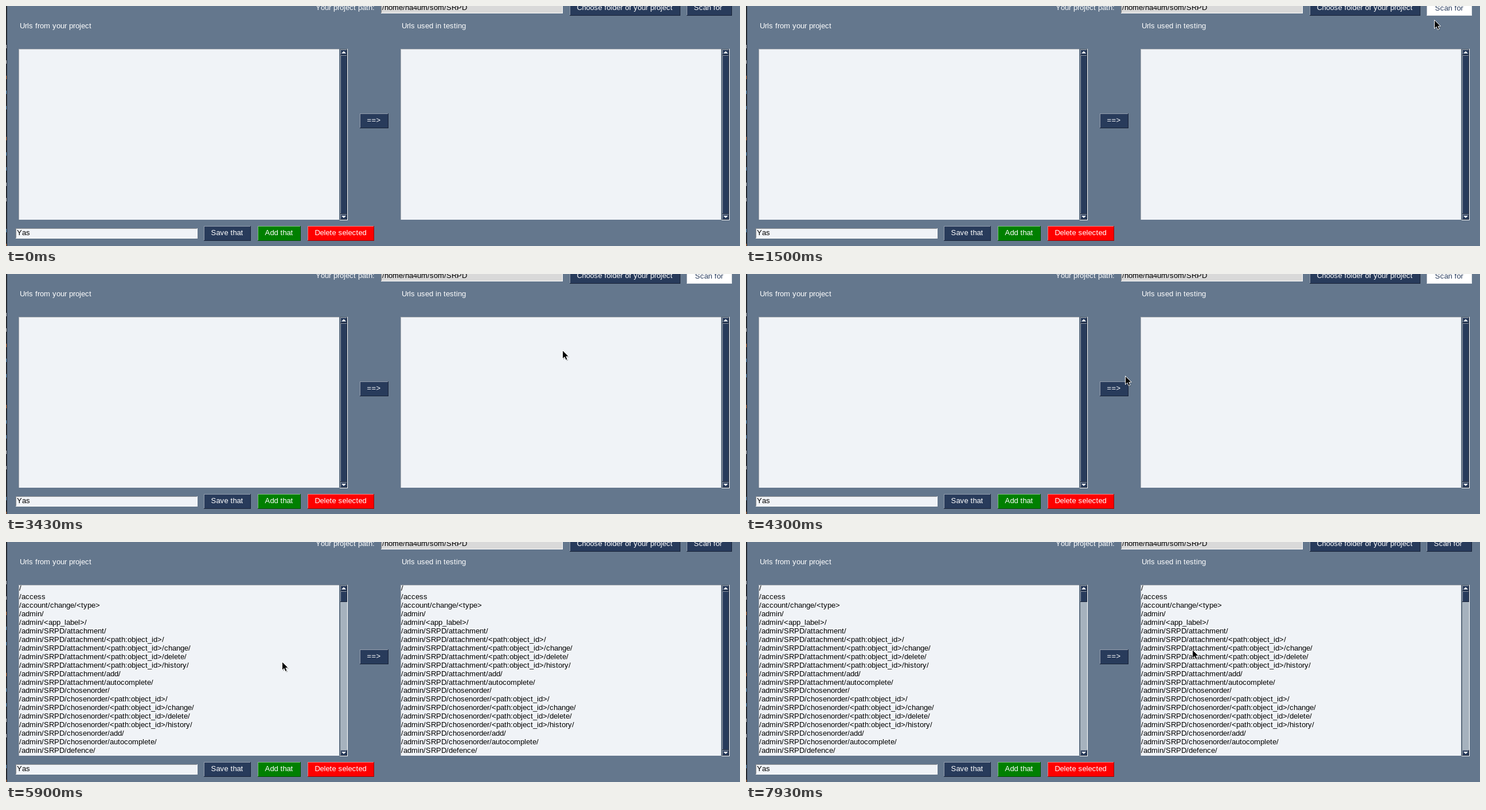
Recreate the animation shown at these times as an HTML page. Size 1280 by 420 pixels, loop 8 s.

```html
<!DOCTYPE html>
<html lang="en">
<head>
<meta charset="utf-8">
<title>Url picker</title>
<style>
  html, body { margin: 0; width: 100%; height: 100%; overflow: hidden; background: #64778d; }
  svg { display: block; }
  rect { shape-rendering: crispEdges; }
  text { font: 13px "Liberation Sans", Arial, sans-serif; font-kerning: none; white-space: pre; }
</style>
</head>
<body>
<svg id="stage" width="1280" height="420" viewBox="0 0 1280 420"></svg>
<script>
const NS = 'http://www.w3.org/2000/svg';
const stage = document.getElementById('stage');
const BACK = '#64778d', NAVY = '#283b5b', PALE = '#f0f3f7', LIGHT = '#939dad', DARK = '#182337';
const LOOP = 8000, HOVER = 850, PRESS = 1040, FILL = 5900, SYNC = 5970, STEP = 64;

const pen = document.createElement('canvas').getContext('2d');
pen.font = '13px "Liberation Sans", Arial, sans-serif';

function add(parent, tag, attrs) {
  const el = document.createElementNS(NS, tag);
  for (const k in attrs) el.setAttribute(k, attrs[k]);
  return parent.appendChild(el);
}

const box = (p, x, y, width, height, fill) => add(p, 'rect', { x, y, width, height, fill });

// Letters advance by whole pixels, as in Tk
const advance = str => [...str].reduce((sum, c) => sum + Math.round(pen.measureText(c).width), 0);

function label(p, str, x, y, fill = '#fff') {
  const xs = [...str].map((c, i) => x + advance(str.slice(0, i)));
  add(p, 'text', { x: xs.join(' '), y, fill }).textContent = str;
}

// Filled box with a one-pixel bevel
function bevel(p, x, y, w, h, fill, hi = LIGHT, lo = DARK) {
  const g = add(p, 'g', {});
  box(g, x, y, w, h, lo);
  box(g, x, y, w - 1, h - 1, hi);
  box(g, x + 1, y + 1, w - 2, h - 2, fill);
  return g;
}

function button(str, x, y, fill = NAVY, hi, lo, ink) {
  const g = bevel(stage, x, y, advance(str) + 26, 26, fill, hi, lo);
  const face = add(g, 'g', {});
  label(face, str, x + 12.5, y + 16, ink);
  return { g, face };
}

const actions = ['', 'change/', 'delete/', 'history/'];
const model = name => {
  const base = '/admin/SRPD/' + name + '/';
  return [base, ...actions.map(a => base + '<path:object_id>/' + a),
    base + 'add/', base + 'autocomplete/'];
};
const urls = ['/', '/access', '/account/change/<type>', '/admin/', '/admin/<app_label>/',
  ...model('attachment'), ...model('chosenorder'), '/admin/SRPD/defence/'];

function list(x) {
  bevel(stage, x, 75, 560, 300, PALE, '#a9adb2', BACK);
  const rows = add(stage, 'svg', { x: x + 1, y: 76, width: 558, height: 298 });
  urls.forEach((u, i) => label(rows, u, 0, 9.2 + 14.94 * i, '#000'));

  const sx = x + 560;
  bevel(stage, sx, 75, 14, 300, '#a6b2be', '#55636f', '#fff');
  const part = (y, h) => bevel(stage, sx + 1, y, 12, h, NAVY);
  const full = part(86, 278), small = part(86, 19);
  part(76, 10);
  part(364, 10);
  add(stage, 'path', { d: `M${sx + 3} 83h8l-4 -4zM${sx + 3} 367h8l-4 4z`, fill: '#fff' });
  return { rows, full, small };
}

// Sliver of the code editor behind the window
function editor() {
  const tones = { w: '#c8ccd2', b: '#5a9bd0', o: '#c8733c' };
  box(stage, 0, 0, 2, 420, '#24272e');
  [...'wwobb.obbww.bo'].forEach((m, i) => {
    if (tones[m]) box(stage, 0, Math.round(68 + 26.8 * i), 1, 6, tones[m]);
  });
}

editor();
box(stage, 2, 0, 1278, 420, BACK);

label(stage, 'Your project path:', 540, 7);
bevel(stage, 654, -8, 317, 21, '#d9d9d9', '#828282', '#fff');
label(stage, '/home/ha4um/som/SRPD', 656, 7, '#000');
button('Choose folder of your project', 983, -9);
const idle = button('Scan for ', 1187, -9);
const hot = button('Scan for ', 1187, -9, '#fff', '#c8ccd2', '#e4e7ea', NAVY);

label(stage, 'Urls from your project', 24, 39);
label(stage, 'Urls used in testing', 690, 39);
const left = list(22), right = list(688);
button('==>', 617, 188);

bevel(stage, 17, 389, 317, 18, PALE, '#909294', '#fff');
label(stage, 'Yas', 19, 401, '#000');
button('Save that', 345, 385);
button('Add that', 439, 385, '#008000', '#80c080', '#004d00');
button('Delete selected', 526, 385, '#f00', '#ff8080', '#990000');

const arrow = 'M-.5 .5V15.5L3 12.3L5.3 17.6L8 16.4L5.8 11.3H10.3Z';
const cursor = add(stage, 'g', {});
add(cursor, 'path', { d: arrow, opacity: .25, transform: 'translate(1.5 1.5)' });
add(cursor, 'path', { d: arrow, stroke: '#fff' });

// Turning points of the pointer: time, x, y
const turns = [
  [300, 1215, -16], [1100, 1251, 4], [1436, 1251, 4], [1500, 1201, 24], [2150, 552, 137],
  [2700, 1059, 150], [3000, 700, 240], [3430, 971, 133], [3880, 727, 200], [4900, 515, 130],
  [5130, 615, 165], [5900, 482, 209], [6350, 689, 160], [7000, 342, 150], [7300, 199, 140],
  [7730, 775, 199], [7930, 779, 188], [LOOP, 779, 188]
];
const ease = k => (1 - Math.cos(Math.PI * k)) / 2;

// Eased move from turn to turn, in steps of about STEP ms
function place(t) {
  const i = turns.findIndex(p => p[0] > t);
  const a = turns[i - 1], b = turns[i], span = b[0] - a[0];
  const n = Math.round(span / STEP);
  const k = ease(Math.floor((t - a[0]) / span * n) / n);
  return [1, 2].map(j => Math.round(a[j] + (b[j] - a[j]) * k));
}

const show = (el, on) => el.setAttribute('visibility', on ? 'visible' : 'hidden');

function fill(pane, rows, scroll) {
  pane.rows.style.display = rows ? '' : 'none';
  show(pane.full, !scroll);
  show(pane.small, scroll);
}

function draw(t) {
  const busy = t >= HOVER && t < FILL, moving = t >= turns[0][0];
  show(idle.g, !busy);
  show(hot.g, busy);
  hot.face.setAttribute('transform', t >= PRESS ? 'translate(2 1)' : '');
  fill(left, t >= FILL, t >= FILL);
  fill(right, t >= FILL, t >= SYNC);
  show(cursor, moving);
  if (moving) cursor.setAttribute('transform', `translate(${place(t)})`);
}

const start = performance.now();
function tick() {
  draw((performance.now() - start) % LOOP);
  requestAnimationFrame(tick);
}
tick();
</script>
</body>
</html>
```
